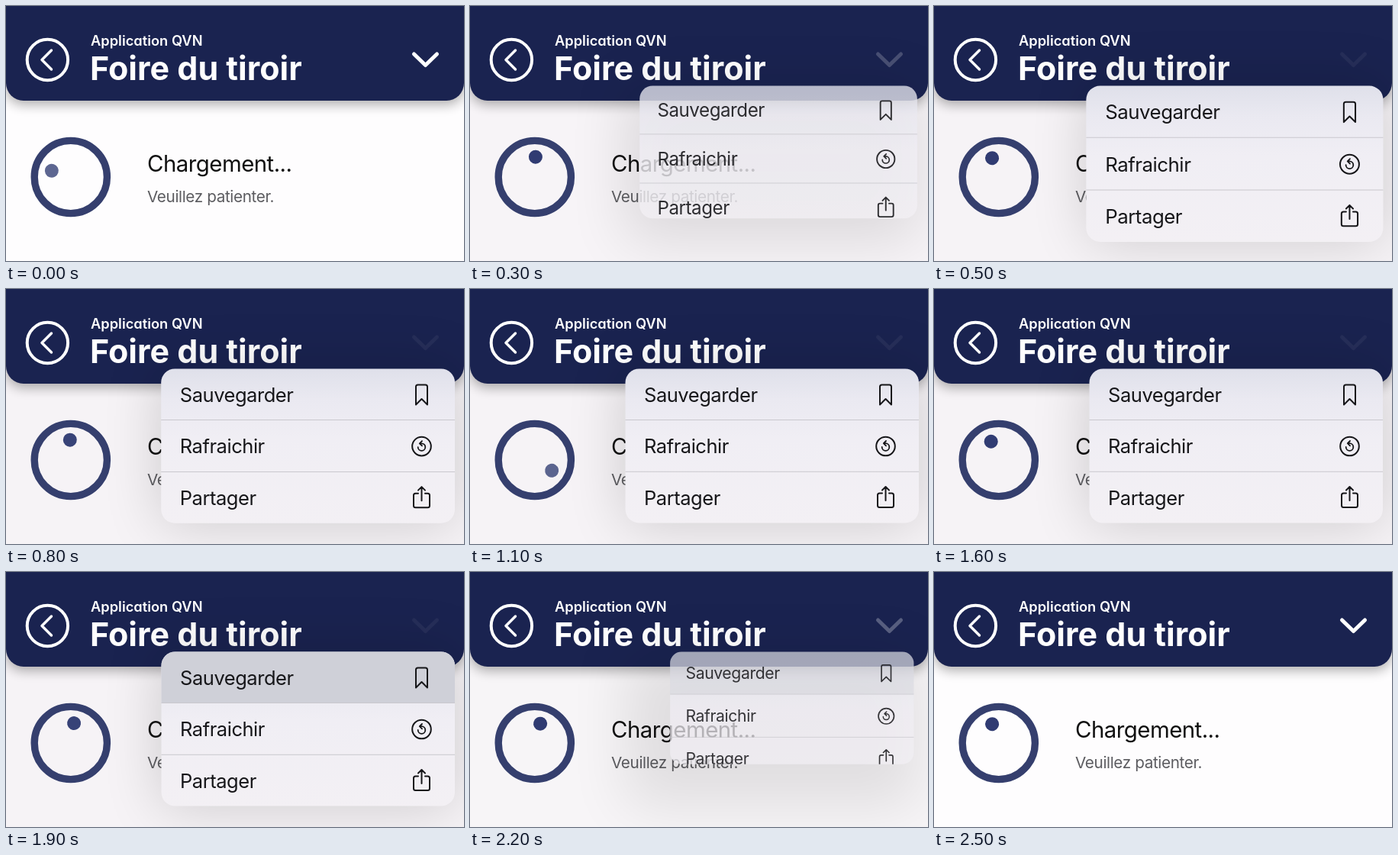
Recreate the animation shown at these times as an HTML page. Size 600 px wide and 334 px high, loop 2.6 s.

```html
<!DOCTYPE html>
<html lang="fr">
<head>
<meta charset="utf-8">
<title>Chargement</title>
<style>
  html, body { margin: 0; width: 100%; height: 100%; overflow: hidden; background: #fefdfe; }
  svg { display: block; width: 600px; height: 334px; }
  text { font-family: Inter, "Liberation Sans", sans-serif; font-optical-sizing: none; letter-spacing: -.018em; }
  .head { fill: #fff; letter-spacing: 0; font-feature-settings: "cv11"; }
  .line { fill: none; stroke-linecap: round; stroke-linejoin: round; }
  .item { font-size: 25.5px; fill: #161619; }
</style>
</head>
<body>
<svg viewBox="0 0 600 334">
  <defs>
    <filter id="soft" x="-20%" y="-30%" width="140%" height="160%"><feGaussianBlur stdDeviation="8"/></filter>
    <filter id="wide" x="-60%" y="-90%" width="220%" height="280%"><feGaussianBlur stdDeviation="38"/></filter>
    <linearGradient id="glass" x1="0" y1="104" x2="0" y2="306" gradientUnits="userSpaceOnUse">
      <stop offset="0" stop-color="#dfe0ea"/>
      <stop offset=".2" stop-color="#eae9f1"/>
      <stop offset=".45" stop-color="#f0eef4"/>
      <stop offset="1" stop-color="#f3f0f4"/>
    </linearGradient>
    <clipPath id="clip"><rect id="panel" x="203.5" y="104.5" width="384.5" height="202" rx="18"/></clipPath>
  </defs>

  <rect width="600" height="334" fill="#fefdfe"/>
  <rect id="tint" width="600" height="334" fill="#f6f3f6"/>
  <rect x="0" y="-30" width="600" height="159" rx="22" fill="#000" opacity=".32" filter="url(#soft)"/>
  <rect x="0" y="-30" width="600" height="154" rx="23" fill="#1a2350"/>

  <g class="line" stroke="#fff">
    <circle cx="54.4" cy="70.5" r="26.7" stroke-width="4"/>
    <path d="M59.500 58L47 70.500L59.500 83" stroke-width="3.5"/>
  </g>
  <text class="head" x="111" y="52.3" font-size="18.3" font-weight="600">Application QVN</text>
  <text class="head" x="110" y="97.3" font-size="43" font-weight="700">Foire du tiroir</text>

  <circle cx="84.8" cy="224" r="47.6" fill="none" stroke="#353f6e" stroke-width="9.4"/>
  <circle id="dot" cx="111.1" cy="224" r="9" fill="#303b72"/>
  <text x="185" y="217" font-size="29.4" fill="#111">Chargement...</text>
  <text x="185" y="257" font-size="20.7" fill="#5c5c60">Veuillez patienter.</text>

  <rect id="shade" x="203" y="104" width="385" height="203" fill="#000" filter="url(#wide)"/>
  <path id="chevron" class="line" d="M534.5 63L549.5 77.500L564.5 63" stroke="#fff" stroke-width="5"/>

  <g id="menu">
    <g clip-path="url(#clip)">
      <g id="back">
        <rect x="203" y="104" width="386" height="203" fill="url(#glass)"/>
        <rect id="press" x="203" y="104" width="386" height="67.5" fill="#cfd0d8"/>
      </g>
      <g id="items">
        <path d="M203 171.5H589M203 239.3H589" stroke="#c9c8ce"/>
        <text class="item" x="228" y="147.7">Sauvegarder</text>
        <text class="item" x="228" y="215.2">Rafraichir</text>
        <text class="item" x="228" y="282.7">Partager</text>
        <g class="line" stroke="#161619" stroke-width="2">
          <path d="M537 128q0-2.5 2.5-2.5h10q2.5 0 2.5 2.5V151.5L544.5 144L537 151.5Z"/>
          <circle cx="544.5" cy="206" r="12.3"/>
          <path d="M539.7 207A4.8 4.8 0 1 0 544.5 202.200H542.500M545 199L541.800 202.200L545 205.400" stroke-width="1.8"/>
          <path d="M540 267.5H536.5q-2.5 0-2.5 2.5V283.5q0 2.5 2.5 2.5H552.5q2.5 0 2.5-2.5V270q0-2.5-2.5-2.5H549M544.5 277V259.5M540 263.5L544.5 259L549 263.5"/>
        </g>
      </g>
    </g>
  </g>
</svg>
<script>
const LOOP = 2600, STEP = 100;
const OPEN = 100, PRESS = 1800, CLOSE = 2000, CLOSE_TIME = 500;
const TURNS = [-76, 1167];

const $ = id => document.getElementById(id);
const set = (id, name, value) => $(id).setAttribute(name, value);
const clamp = v => Math.min(1, Math.max(0, v));

// Springs open, then shrinks away with a quadratic ease.
function menuPose(t) {
  if (t < CLOSE) {
    const s = Math.max(0, t - OPEN) / 1000;
    return { scale: 1 - .8 * Math.exp(-9.3 * s) * Math.cos(5.6 * s), alpha: clamp(4 * s) };
  }
  const q = (t - CLOSE) / CLOSE_TIME;
  return { scale: Math.max(.2, 1 - 1.06 * q * q), alpha: clamp(1 - 1.7 * q * q) };
}

// A slow sway around the top, plus a quick full turn now and then.
function spinAngle(t) {
  const sway = 270 + 22 * Math.cos((t - 2080) / 1000 * 2 * Math.PI);
  return TURNS.reduce((a, c) => a + 360 / (1 + Math.exp((c - t) / 70)), sway);
}

function draw(t) {
  const { scale, alpha } = menuPose(t);
  set("menu", "transform", `translate(549 104.5) scale(${scale}) translate(-549 -104.5)`);
  set("panel", "height", 202 * (.55 + .45 * alpha));
  set("back", "opacity", alpha);
  set("items", "opacity", Math.sqrt(alpha));
  set("press", "opacity", t < PRESS ? 0 : alpha * alpha);
  set("shade", "opacity", .17 * alpha * alpha);
  set("tint", "opacity", alpha);
  set("chevron", "opacity", Math.max(.05, 1 - alpha));

  const angle = spinAngle(t), speed = angle - spinAngle(t - 50);
  set("dot", "transform", `rotate(${angle} 84.8 224)`);
  set("dot", "opacity", 1 - .22 * clamp(speed / 40));
}

const start = performance.now();
function tick() {
  const t = (performance.now() - start) % LOOP;
  draw(Math.floor(t / STEP) * STEP);
  requestAnimationFrame(tick);
}
tick();
</script>
</body>
</html>
```
